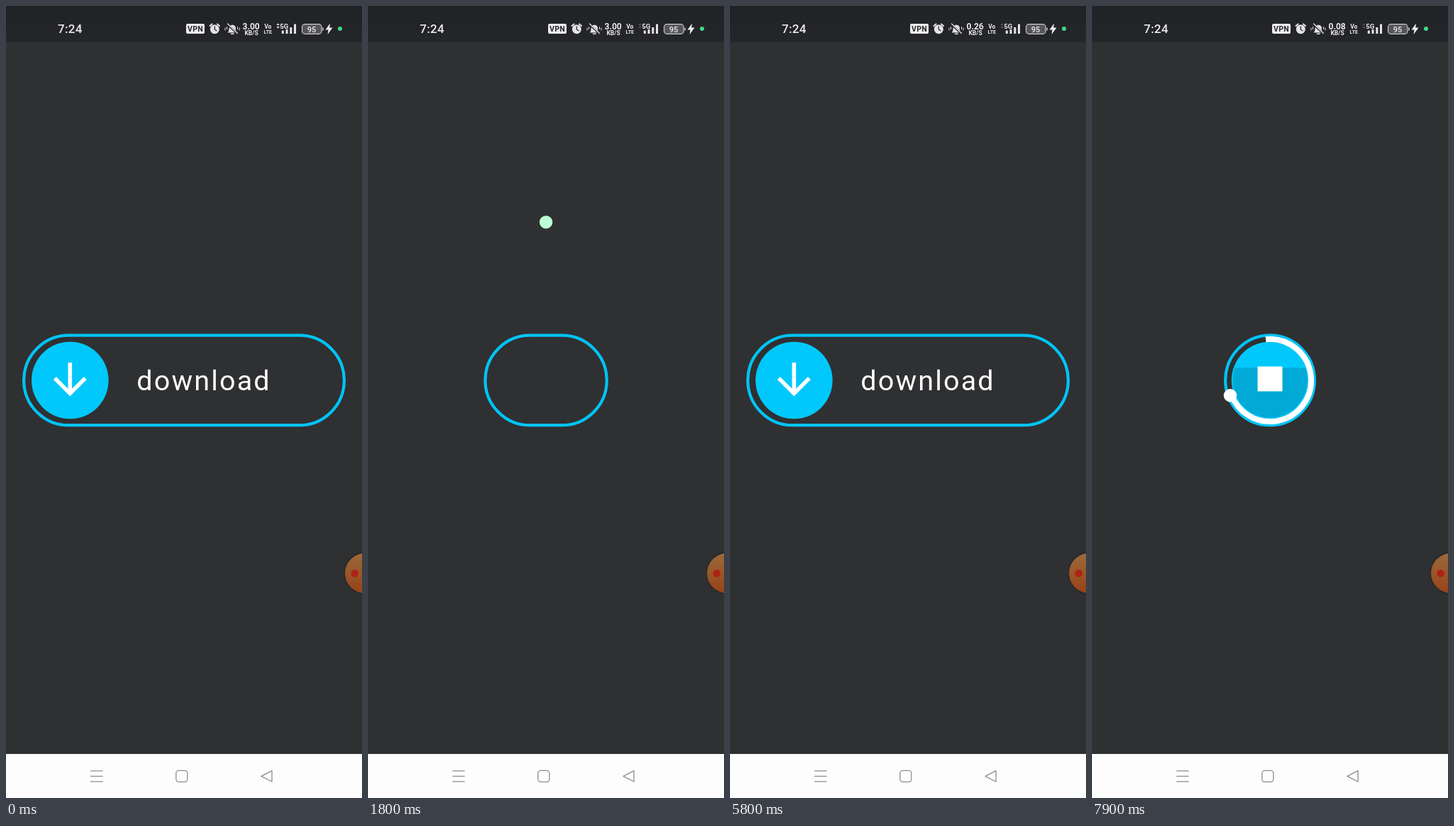
An HTML page that plays this animation: 502x1115 px, repeating every 8 s.

```html
<!DOCTYPE html>
<html lang="en">
<head>
<meta charset="utf-8">
<title>Download button</title>
<style>
  html, body { margin: 0; width: 100%; height: 100%; overflow: hidden; background: #2f3032; }
  svg { display: block; width: 100vw; height: 100vh; }
  text { font-family: Roboto, Inter, sans-serif; }
  .status text { fill: #ececed; font-weight: 700; text-anchor: middle; }
</style>
</head>
<body>
<svg viewBox="0 0 502 1115" preserveAspectRatio="none">
  <defs>
    <linearGradient id="bar" x2="0" y2="1">
      <stop offset="0" stop-color="#212226"/><stop offset="1" stop-color="#25262a"/>
    </linearGradient>
    <linearGradient id="orange" x2="0" y2="1">
      <stop offset="0" stop-color="#9b6a3a"/><stop offset="1" stop-color="#984218"/>
    </linearGradient>
    <clipPath id="inside"><circle cx="251" cy="527" r="52.5"/></clipPath>
  </defs>
  <rect width="502" height="1115" fill="#2f3032"/>
  <rect width="502" height="51" fill="url(#bar)"/>

  <g class="status">
    <text x="90.3" y="38" style="font-size:17px;font-weight:500;letter-spacing:.3px">7:24</text>
    <rect x="254" y="25" width="26" height="14" rx="2" fill="#eeeeef"/>
    <text x="267" y="36" style="font-size:10.5px;fill:#26272a;letter-spacing:.3px">VPN</text>
    <g fill="none" stroke="#e4e4e5" stroke-linecap="round">
      <circle cx="294.3" cy="32.7" r="6.5" fill="#e4e4e5" stroke="none"/>
      <path d="M287.5 28l3-2.6M301 28l-3-2.6" stroke-width="2"/>
      <path d="M294.3 29v4l2.6 1.8" stroke="#26272a" stroke-width="1.3"/>
      <path d="M312.5 37.5q2-1.5 2-6q0-4.5 4.7-5q4.700 .5 4.700 5q0 4.500 2 6z" fill="#e4e4e5" stroke="none"/>
      <path d="M317.500 39.300h3.500" stroke-width="1.600"/>
      <path d="M312 25.500l15 14" stroke="#242529" stroke-width="3"/>
      <path d="M312.500 25l14 13.500" stroke-width="1.300"/>
      <path d="M309 31v3M311.500 29.500v3M329 31v3M326.500 29.500v3" stroke-width="1"/>
    </g>
    <text id="speed" x="345.7" y="33" style="font-size:12px"></text>
    <text x="346" y="41" style="font-size:8.500px">KB/S</text>
    <text x="369.300" y="31.500" style="font-size:8.500px">Vo</text>
    <text x="369.300" y="39" style="font-size:7px">LTE</text>
    <path id="arrows" d="M381.300 27l2.300-2.800 2.300 2.800zM381.300 29l2.300 2.800 2.300-2.800z" fill="#e4e4e5"/>
    <text x="392.300" y="31.500" style="font-size:9.500px">5G</text>
    <path d="M390.300 34.500v4.500M396 33v6M401.800 30v9M407.500 25.500v13.500" stroke="#e4e4e5" stroke-width="3"/>
    <rect x="417.500" y="25.700" width="27.500" height="13.600" rx="3.800" fill="#55565a" stroke="#c9c9cb" stroke-width="1.200"/>
    <path d="M447 30.500v4" stroke="#c9c9cb" stroke-width="1.500"/>
    <text x="431" y="36.600" style="font-size:11px;font-weight:500">95</text>
    <path d="M457 24.500l-6.500 9h4l-1 6.500 7-9.500h-4.300z" fill="#f0f0f0"/>
    <circle cx="471" cy="32" r="3" fill="#3ddc84"/>
  </g>

  <rect id="pill" y="463.600" height="126.600" rx="63.300" fill="none" stroke="#00c4f5" stroke-width="4.200"/>
  <g id="disc">
    <circle r="54.300" fill="#00c8fa"/>
    <path id="arrow" d="M0-25V18M-21.500-3L0 18.500 21.500-3" fill="none" stroke="#fff" stroke-width="5.600"/>
  </g>
  <g clip-path="url(#inside)"><rect id="level" x="190" width="122" height="120" fill="#00a9d6"/></g>
  <rect id="stop" x="-17.500" y="-17.500" width="35" height="35" fill="#fff"/>
  <circle id="arc" cx="251" cy="527" r="58" pathLength="360" transform="rotate(-96 251 527)" fill="none" stroke="#fff" stroke-width="8"/>
  <circle id="ball" r="9.200"/>
  <text id="label" x="184.300" y="541" fill="#fff" style="font-size:39.500px;letter-spacing:2.150px">download</text>

  <circle cx="506" cy="798.500" r="30" fill="#292a2c"/>
  <circle cx="506" cy="798.500" r="28" fill="url(#orange)"/>
  <circle cx="491.700" cy="798.700" r="5.200" fill="#ad2116"/>

  <rect y="1053" width="502" height="62" fill="#fefdfe"/>
  <g fill="none" stroke="#8d8b8e" stroke-width="1.300">
    <path d="M119 1076.800h17.500M119 1084.300h17.500M119 1091.800h17.500"/>
    <rect x="239.800" y="1076.300" width="16" height="16" rx="3.800"/>
    <path d="M360 1084.300l15-7.700v15.400z" stroke-linejoin="round"/>
  </g>
</svg>

<script>
const LOOP = 8000, STEP = 100, CX = 251, CY = 527;
const FULL = 456, ROUND = 130, OPEN = 305;
const el = id => document.getElementById(id);
const [pill, disc, arrow, level, stopBox, arc, ball, label, speed, arrows] =
  ['pill', 'disc', 'arrow', 'level', 'stop', 'arc', 'ball', 'label', 'speed', 'arrows'].map(el);

const ramp = (t, a, b) => Math.min(1, Math.max(0, (t - a) / (b - a)));
const mix = (a, b, k) => a + (b - a) * k;
const ease = k => k * k * (3 - 2 * k);
const set = (node, attrs) => { for (const k in attrs) node.setAttribute(k, attrs[k]); };
const place = (node, x, y, s) => set(node, {
  transform: `translate(${x} ${y}) scale(${s})`,
  visibility: s > 0 ? 'visible' : 'hidden'
});

// s is the time since the tap
function download(s) {
  const start = ramp(s, 0, 200), end = ramp(s, 1155, 1340), fly = ramp(s, 1155, 2095);
  const turn = 360 * ramp(s, 455, 1170);
  let width = mix(FULL, ROUND, ramp(s, 0, 430));
  width = fly ? mix(ROUND, OPEN, fly) : width;
  width = mix(width, FULL, ease(ramp(s, 3440, 3700)));
  const back = ease(ramp(s, 4540, 4950)), icon = ease(ramp(s, 4740, 5200));

  let x = CX + 60 * Math.sin(turn * Math.PI / 180);
  let y = CY - 60 * Math.cos(turn * Math.PI / 180);
  if (fly) {
    x = CX;
    y = fly < .5 ? mix(256, 467, (1 - 2 * fly) ** 2) : mix(256, 571.3, (2 * fly - 1) ** 2);
  }
  return {
    width, turn, end, x, y,
    tint: fly,
    disc: back || 1 - end,
    arrow: icon || 1 - ease(start),
    stop: ease(ramp(s, 50, 220)) * (1 - end),
    ball: ramp(s, 440, 520) * (1 - ease(ramp(s, 2940, 3300))),
    label: icon || 1 - ramp(s, 0, 180)
  };
}

function draw(t) {
  const p = download(t < 6900 ? t - 400 : t - 6950);
  const left = CX - p.width / 2;
  set(pill, { x: left + 2.1, width: p.width - 4.2 });

  const cx = left + mix(65, 67.3, (p.width - ROUND) / (FULL - ROUND));
  place(disc, p.disc < 1 && !p.end ? cx : cx + (p.end && p.width < FULL ? CX - cx : 0), CY, p.disc);
  set(arrow, { transform: `translate(0 0) scale(${p.arrow})`, opacity: p.arrow });
  place(stopBox, p.end ? CX : cx, 525, p.stop);

  set(level, { y: 581.7 - 104.5 * p.turn / 360, opacity: p.turn && !p.end ? 1 : 0 });
  const tail = 366 * p.end, length = p.turn ? Math.min(360, p.turn + 6) : 0;
  const visible = Math.max(0, length - tail);
  set(arc, {
    'stroke-dasharray': `${visible} 400`,
    'stroke-dashoffset': -Math.min(tail, 360),
    visibility: visible > 0 ? 'visible' : 'hidden'
  });

  place(ball, p.x, p.y, p.ball);
  set(ball, { fill: `rgb(${mix(255, 0, p.tint)},255,${mix(255, 92, p.tint)})` });
  set(label, { opacity: p.label });

  speed.textContent = t < 2300 ? '3.00' : t < 6300 ? '0.26' : '0.08';
  set(arrows, { opacity: t < 600 || (t >= 6600 && t < 7600) ? 1 : .25 });
}

const begin = performance.now();
function frame() {
  const t = (performance.now() - begin) % LOOP;
  draw(Math.floor(t / STEP) * STEP);
  requestAnimationFrame(frame);
}
frame();
</script>
</body>
</html>
```
